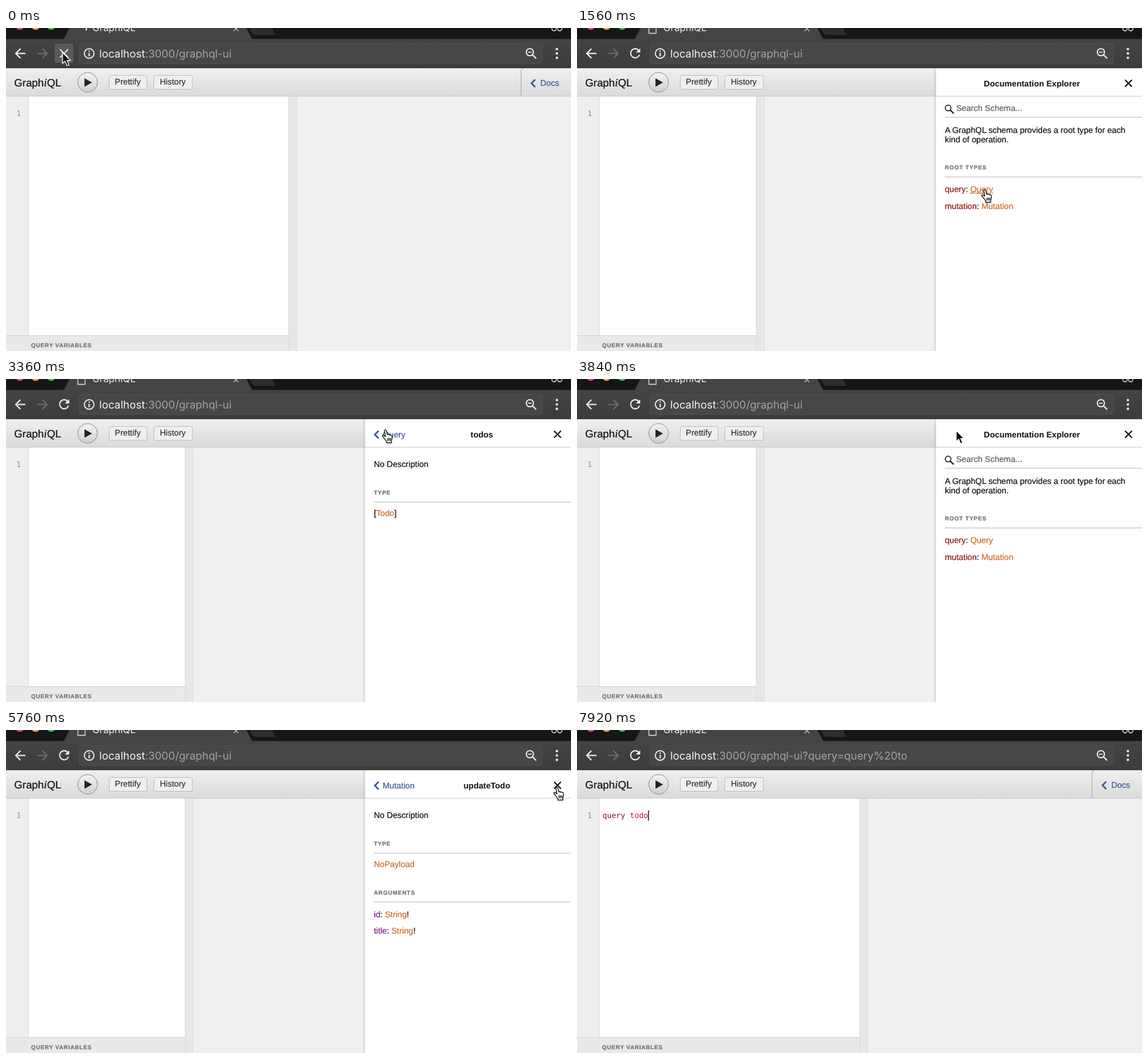
These frames come from a looping animation (900x514 px, 8 s). An HTML page:

```html
<!DOCTYPE html>
<html lang="en">
<head>
<meta charset="utf-8">
<title>GraphiQL</title>
<style>
html, body { margin: 0; width: 100%; height: 100%; overflow: hidden; background: #fff; }
svg { display: block; width: 100vw; height: 100vh; }
text {
  font: 13.26px "Liberation Sans", Arial, sans-serif; white-space: pre; text-rendering: geometricPrecision;
  color: #111; fill: currentColor; stroke: currentColor; stroke-width: .22px;
}
.ui { font-family: Inter, Roboto, sans-serif; stroke: none; }
.bold { font-weight: bold; font-size: 13.2px; stroke: none; }
.caps { font-size: 9px; font-weight: bold; letter-spacing: .86px; color: #6d6f73; }
.mono { font: 12.1px "DejaVu Sans Mono", monospace; stroke: none; }
.key { color: #961616; } .type { color: #cb6a28; } .field { color: #1f61a0; }
.arg { color: #7d2382; } .nav { color: #3b5998; }
.line { fill: none; stroke-width: 2; }
</style>
</head>
<body>
<svg id="stage" viewBox="0 0 900 514" preserveAspectRatio="none">
  <defs>
    <linearGradient id="bar" x2="0" y2="1"><stop stop-color="#f0f0f0"/><stop offset="1" stop-color="#dadada"/></linearGradient>
    <linearGradient id="chrome" x2="0" y2="1"><stop stop-color="#444"/><stop offset="1" stop-color="#3c3c3c"/></linearGradient>
    <linearGradient id="knob" x2="0" y2="1"><stop stop-color="#f4f4f4"/><stop offset="1" stop-color="#cfcfcf"/></linearGradient>
    <linearGradient id="shade"><stop stop-color="#000" stop-opacity="0"/><stop offset="1" stop-color="#000" stop-opacity=".1"/></linearGradient>
  </defs>

  <rect width="900" height="18" fill="#151618"/>
  <circle cx="22" cy="-4" r="7" fill="#e0457f"/>
  <circle cx="47" cy="-4" r="7" fill="#f6a04d"/>
  <circle cx="72" cy="-4" r="7" fill="#2fc843"/>
  <path d="M91 18L93 16L101 0H383L391 16L393 18Z" fill="#444"/>
  <path d="M388 0H424L429 11H399Q394 11 392 8Z" fill="#2d2d2f"/>
  <path id="favicon" d="M114.5-5H126V8.5H114.5Z" fill="none" stroke="#ddd" stroke-width="1.3"/>
  <path id="spinner" d="M0-7A7 7 0 0 1 6 4" class="line" stroke="#f2f2f2"/>
  <text class="ui" x="137.5" y="5" style="font-size:15.5px;color:#eee">GraphiQL</text>
  <path d="M362.5-2.5L370 5M370-2.5L362.5 5" stroke="#bbb" stroke-width="1.3"/>
  <g fill="none" stroke="#ddd" stroke-width="1.4"><circle cx="873" cy="1" r="3.5"/><circle cx="882" cy="1" r="3.5"/></g>

  <rect y="17.5" width="900" height="46.5" fill="url(#chrome)"/>
  <rect x="116.5" y="24.5" width="738" height="32" rx="3" fill="#474747" stroke="#4e4e4e"/>
  <path d="M31 40.5H15.5M23 33L15.5 40.5L23 48" class="line" stroke="#f1f1f1"/>
  <path d="M50 40.5H65.5M58 33L65.5 40.5L58 48" class="line" stroke="#6c6c6c"/>
  <g id="stop"><rect x="77.5" y="25" width="30" height="30.5" rx="3" fill="#5a5a5a"/><path d="M86 34L99 47M99 34L86 47" class="line" stroke="#e4e4e4"/></g>
  <g id="reload"><path d="M97.8 35.2A7.2 7.2 0 1 0 99.5 42.5" class="line" stroke="#f1f1f1"/><path d="M100.7 32.2V39H93.9Z" fill="#f1f1f1"/></g>
  <circle cx="132.5" cy="40.5" r="7.7" fill="none" stroke="#f1f1f1" stroke-width="1.7"/>
  <path d="M132.5 39.5V45M132.5 35.8V37.8" class="line" stroke="#f1f1f1"/>
  <text class="ui" x="148.5" y="47" style="font-size:17.1px;color:#a3a3a3"><tspan color="#f3f3f3">localhost</tspan><tspan id="path"></tspan></text>
  <g class="line" stroke="#f1f1f1"><circle cx="834.5" cy="38.5" r="5.7" stroke-width="1.8"/><path d="M838.5 42.5L844.5 48.5"/><path d="M831.5 38.5H837.5" stroke-width="1.5"/></g>
  <g fill="#e8e8e8"><circle cx="877.5" cy="33.5" r="2"/><circle cx="877.5" cy="40.5" r="2"/><circle cx="877.5" cy="47.5" r="2"/></g>

  <rect y="64" width="900" height="44.5" fill="url(#bar)"/>
  <text x="13" y="93" style="font-size:17px">Graph<tspan style="font:italic 18px 'Liberation Serif',serif">i</tspan>QL</text>
  <circle cx="130" cy="86.5" r="15.7" fill="url(#knob)" stroke="#8d8d8d"/>
  <path d="M125 80V93.5L137 86.7Z" fill="#222"/>
  <g fill="#efefef" stroke="#bdbdbd"><rect x="164.5" y="75.5" width="60" height="22" rx="2.5"/><rect x="235.5" y="75.5" width="61.5" height="22" rx="2.5"/></g>
  <text x="173.3" y="90" style="color:#333">Prettify</text>
  <text x="245" y="90" style="color:#333">History</text>
  <path d="M820.5 108V68Q820.5 64.5 824 64.5" fill="none" stroke="#aaa"/>
  <path d="M843 82L837 88L843 94" fill="none" stroke="#3b5998" stroke-width="2.5"/>
  <text class="nav" x="851" y="91.5">Docs</text>

  <rect y="109" width="900" height="405" fill="#f0f0f0"/>
  <rect id="editor" y="109" height="380" fill="#fff"/>
  <rect y="109" width="35.5" height="380" fill="#eee"/>
  <path d="M35.5 109V489" stroke="#d8d8d8"/>
  <rect id="footer" y="489" height="25" fill="#e9e9e9"/>
  <path id="footline" stroke="#cfcfcf"/>
  <g id="split"><rect y="109" width="13" height="405" fill="#e7e7e7"/><path d="M.5 109V514M13 109V514" stroke="#dadada"/></g>
  <path d="M0 108.5H900" stroke="#c9c9c9"/>
  <text class="caps" x="40" y="507.5" style="letter-spacing:.76px">QUERY VARIABLES</text>
  <text class="mono" x="16.5" y="140" style="color:#8f8f8f">1</text>
  <text class="mono" x="40.5" y="140"><tspan id="word"></tspan><tspan id="name" color="#c2104f"></tspan></text>
  <rect id="caret" y="128" width="1.4" height="16" fill="#111"/>

  <g id="panel">
    <rect x="567" y="64" width="5" height="450" fill="url(#shade)"/>
    <rect x="572" y="64" width="328" height="450" fill="#fff"/>
    <path d="M572 108.5H900" stroke="#cecece"/>
    <path d="M873 82.5L884 93.5M884 82.5L873 93.5" class="line" stroke="#111"/>
    <g id="docs"></g>
  </g>

  <g id="cursor">
    <path id="arrow" d="M0 0V17.5L4 13.8L7 21L10.3 19.6L7.3 12.6H12.5Z" fill="#111" stroke="#fff" stroke-width="1.3"/>
    <path id="hand" transform="translate(-3.5 -1)" d="M2.5 2C2-.2 5-.6 5.6 1.6L7 7.5C7.8 6.5 9.3 6.9 9.5 7.9C10.5 7.1 11.7 7.6 12 8.6C13.1 7.9 14.4 8.6 14.5 9.8C14.8 12.8 14.7 14.3 13.5 16.8V20.5H5.5V18C3.5 15.5 1.5 12.5-.6 10.2C-1.6 8.8 0 7.6 1.3 8.6L4.1 10.6ZM7.5 13V17.5M9.7 13V17.5M11.9 13V17.5" fill="#fff" stroke="#111" stroke-width="1.3" stroke-linejoin="round"/>
    <path id="beam" d="M-3-8Q0-8 0-6Q0-8 3-8M0-6V6M-3 8Q0 8 0 6Q0 8 3 8" fill="none" stroke="#222" stroke-width="1.2"/>
  </g>
</svg>
<script>
const LOOP = 8000, STEP = 120;
const $ = id => document.getElementById(id);
const show = (id, on) => $(id).setAttribute('display', on ? 'inline' : 'none');
const set = (id, attrs) => Object.entries(attrs).forEach(([k, v]) => $(id).setAttribute(k, v));

// Row markup: k keyword, t type, f field, a argument; everything else is plain.
const KIND = { k: 'key', t: 'type', f: 'field', a: 'arg' };
const rich = s => s.replace(/([ktfa])<(\w+)>/g, (_, k, word) =>
  `<tspan class="${KIND[k]}"${k === 't' || k === 'f' ? ' data-link="1"' : ''}>${word}</tspan>`);
const label = (x, y, s, cls = '') => `<text x="${x}" y="${y}" class="${cls}">${s}</text>`;
const rule = y => `<path d="M586 ${y}H900" stroke="#cfcfcf" stroke-width="1.3"/>`;
const section = (y, title, rows, gap = 36) => label(586, y, title, 'caps') + rule(y + 12) +
  rows.map(([dy, s]) => label(586, y + gap + dy, rich(s))).join('');
const header = (title, mid, back) => `<g text-anchor="middle">${label(mid, 93, title, 'bold')}</g>` +
  (back ? '<path d="M593.5 82.5L587.5 88.5L593.5 94.5" fill="none" stroke="#3b5998" stroke-width="2.5"/>' + label(600, 93, back, 'nav') : '');
const search = what => '<path d="M594.5 130.5L600 136" class="line" stroke="#111"/><circle cx="591.2" cy="127.2" r="4.5" fill="none" stroke="#111" stroke-width="1.5"/>' +
  `<g opacity=".68">${label(604, 131.5, `Search ${what}...`)}</g>` + rule(142);

const objectView = (name, mid, back, rows) => header(name, mid, back) + search(name) +
  label(586, 166.5, 'No Description') + section(210, 'FIELDS', rows);
const fieldView = (name, mid, back, type) => header(name, mid, back) +
  label(586, 140, 'No Description') + section(184, 'TYPE', [[0, type]], 33.5);

const VIEWS = {
  root: header('Documentation Explorer', 724.7) + search('Schema') +
    label(586, 166.5, 'A GraphQL schema provides a root type for each') + label(586, 181.5, 'kind of operation.') +
    section(225, 'ROOT TYPES', [[0, 'k<query>: t<Query>'], [26.5, 'k<mutation>: t<Mutation>']]),
  query: objectView('Query', 764, 'Schema', [[0, 'f<todos>: [t<Todo>]']]),
  todos: fieldView('todos', 758, 'Query', '[t<Todo>]'),
  todo: objectView('Todo', 756, 'todos', [[0, 'f<id>: t<String>!'], [26, 'f<title>: t<String>!'], [52, 'f<completed>: t<Boolean>!']]),
  mutation: objectView('Mutation', 764, 'Schema', [
    [0, 'f<createTodo>(a<title>: t<String>!): t<Todo>'],
    [26, 'f<updateTodo>('], [41, '  a<id>: t<String>!'], [56, '  a<title>: t<String>!'], [71, '): t<NoPayload>'],
    [97, 'f<deleteTodo>(a<id>: t<String>!): t<NoPayload>'],
    [123, 'f<completeTodo>(a<id>: t<String>!): t<NoPayload>']]),
  update: fieldView('updateTodo', 766, 'Mutation', 't<NoPayload>') +
    section(261.5, 'ARGUMENTS', [[0, 'a<id>: t<String>!'], [26, 'a<title>: t<String>!']])
};

const SCENES = [[0, ''], [900, 'root'], [1650, 'query'], [2350, 'todos'], [2600, 'todo'], [3200, 'todos'],
  [3450, 'query'], [3700, 'root'], [4300, 'mutation'], [5100, 'update'], [5850, '']];
const MOVES = [[0, 90, 39], [240, 90, 39], [800, 863, 86], [1000, 863, 86], [1500, 649, 258], [1800, 649, 258],
  [2160, 603, 243], [2360, 603, 243], [2500, 601, 206], [2700, 601, 206], [3060, 604, 82], [3900, 604, 82],
  [4250, 668, 283], [4400, 668, 283], [4800, 622, 268], [5450, 622, 268], [5720, 877, 92], [6120, 877, 92],
  [6240, 860, 94], [6700, 180, 190]];

function pointer(t) {
  const i = MOVES.findIndex(m => m[0] > t);
  if (i < 0) return MOVES[MOVES.length - 1].slice(1);
  const [t0, x0, y0] = MOVES[i - 1], [t1, x1, y1] = MOVES[i];
  const u = (t - t0) / (t1 - t0), e = u * u * (3 - 2 * u);
  return [x0 + (x1 - x0) * e, y0 + (y1 - y0) * e];
}

// Underlines the link below the pointer and reports whether there is one.
function hoverLinks(x, y) {
  let hit = false;
  for (const link of document.querySelectorAll('[data-link]')) {
    const base = link.parentNode.y.baseVal[0].value;
    const last = link.getNumberOfChars() - 1;
    const on = x >= link.getStartPositionOfChar(0).x && x <= link.getEndPositionOfChar(last).x && Math.abs(base - 4 - y) < 8;
    link.style.textDecoration = on ? 'underline' : 'none';
    hit = hit || on;
  }
  return hit;
}

let current;
function render(time) {
  const t = Math.floor(time / STEP) * STEP;
  const view = SCENES.filter(s => s[0] <= t).pop()[1];
  if (view !== current) {
    current = view;
    $('docs').innerHTML = VIEWS[view] || '';
    show('panel', view);
    const w = view ? 285 : 450;
    set('editor', { width: w });
    set('footer', { width: w });
    set('footline', { d: `M0 489.5H${w}` });
    set('split', { transform: `translate(${w})` });
  }

  const loading = t < 480;
  show('stop', loading);
  show('reload', !loading);
  show('spinner', loading);
  show('favicon', !loading);
  set('spinner', { transform: `translate(121 0) rotate(${t * .6})` });

  const [x, y] = pointer(t);
  const onLink = hoverLinks(x, y);
  const inHead = y > 70 && y < 106;
  const onButton = inHead && (view ? x > 868 || (x < 650 && x > 580 && view !== 'root') : x > 822);
  const inEditor = !view && x < 450 && y > 109;
  show('hand', onLink || onButton);
  show('beam', inEditor);
  show('arrow', !onLink && !onButton && !inEditor);
  show('cursor', t < 6900);
  set('cursor', { transform: `translate(${x} ${y})` });

  const typed = 'query todo'.slice(0, Math.max(0, Math.ceil((t - 6940) / 105)));
  $('word').textContent = typed.slice(0, 6);
  $('name').textContent = typed.slice(6);
  set('word', { color: typed.length < 5 ? '#b0104e' : '#8f0f26' });
  show('caret', t >= 6720);
  set('caret', { x: 40.3 + typed.length * 7.285 });
  const sent = typed.slice(0, -2);
  $('path').textContent = ':3000/graphql-ui' + (sent ? '?query=' + encodeURIComponent(sent) : '');
}

const start = performance.now();
function tick(now) {
  render(Math.max(0, now - start) % LOOP);
  requestAnimationFrame(tick);
}
render(0);
requestAnimationFrame(tick);
</script>
</body>
</html>
```
